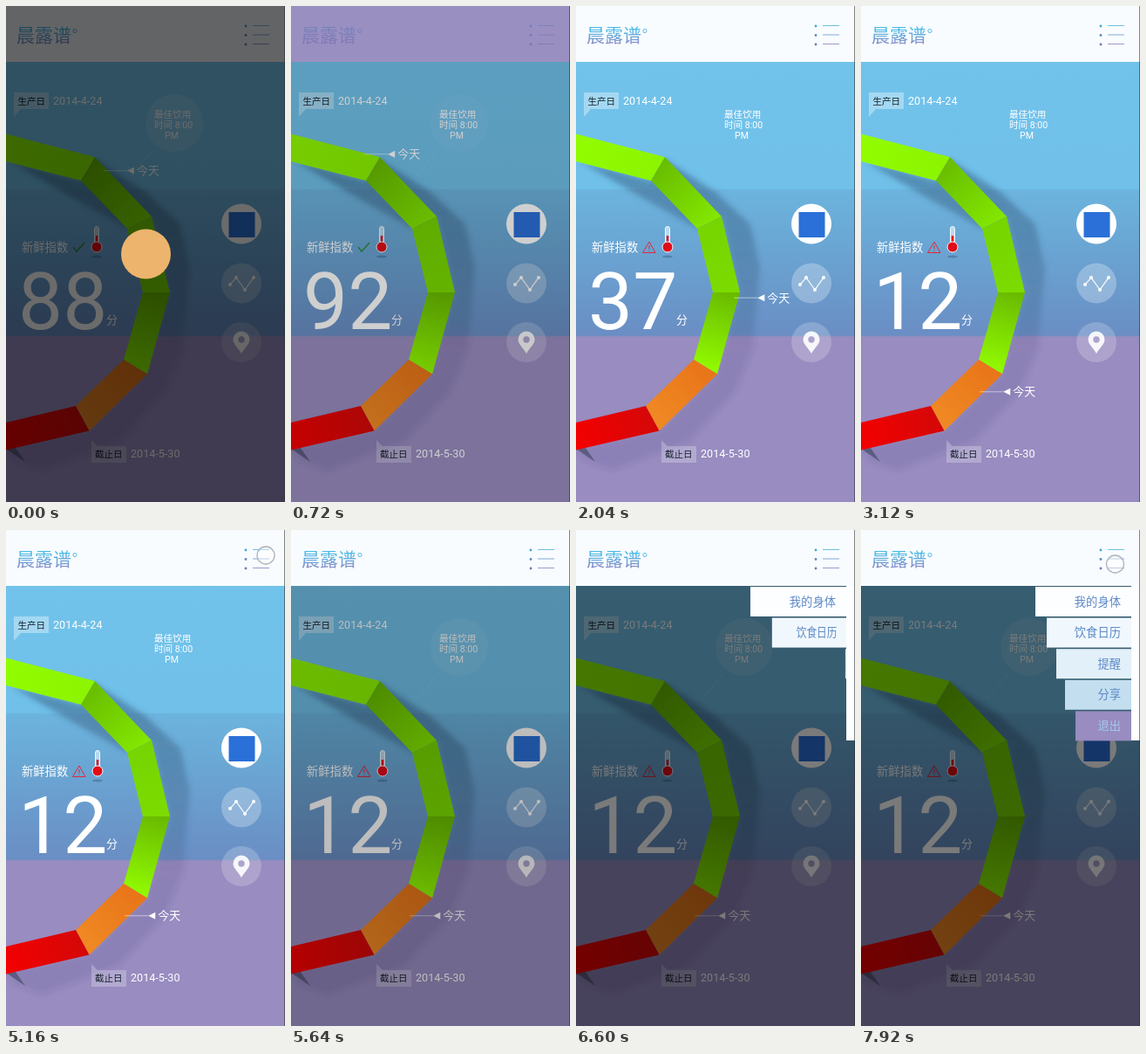
These frames come from a looping animation (320x568 px, 8000 ms). An HTML page:

```html
<!DOCTYPE html>
<html lang="zh">
<head>
<meta charset="utf-8">
<style>
  html, body { margin: 0; width: 100%; height: 100%; overflow: hidden; background: #988cc0; }
  svg { display: block; width: 100vw; height: 100vh; font-family: Roboto, "Noto Sans CJK SC", sans-serif; }
  .w { fill: #fff; }
  .line { fill: none; stroke: #fff; }
</style>
</head>
<body>
<svg viewBox="0 0 320 568">
  <defs>
    <linearGradient id="scene" gradientUnits="userSpaceOnUse" x1="0" y1="0" x2="0" y2="568">
      <stop offset="0" stop-color="#72c4ec"/>
      <stop offset=".368" stop-color="#70c0e9"/>
      <stop offset=".371" stop-color="#6cb4de"/>
      <stop offset=".45" stop-color="#6aaad6"/>
      <stop offset=".664" stop-color="#6a8ec4"/>
      <stop offset=".667" stop-color="#988cc0"/>
      <stop offset="1" stop-color="#988cc0"/>
    </linearGradient>
    <linearGradient id="ink" x1="0" y1="0" x2="0" y2="1">
      <stop offset=".2" stop-color="#4cbbe6"/>
      <stop offset=".9" stop-color="#8a8cc8"/>
    </linearGradient>
    <linearGradient id="shade" gradientUnits="userSpaceOnUse" x1="0" y1="180" x2="0" y2="530">
      <stop offset="0" stop-color="#34587c" stop-opacity=".5"/>
      <stop offset=".5" stop-color="#34587c" stop-opacity=".24"/>
      <stop offset=".6" stop-color="#40386c" stop-opacity=".12"/>
      <stop offset="1" stop-color="#40386c" stop-opacity=".12"/>
    </linearGradient>
    <filter id="soft"><feGaussianBlur stdDeviation="3"/></filter>
  </defs>

  <rect width="320" height="568" fill="url(#scene)"/>
  <path fill="url(#shade)" filter="url(#soft)" d="M5 178L86 200 101 175 160 213 200 250 211 300 203 392 182 442 130 498 42 532 8 520 0 506 95 486 161 421 187 328 166 241 139 255 80 222Z"/>
  <path fill="#5c5c80" d="M0 507L11 506 22 522Z"/>
  <g id="ring"></g>

  <g id="bubble">
    <circle class="w" cx="193" cy="134" r="33" opacity=".3"/>
    <path class="line" d="M170 164L143 195" opacity=".5"/>
  </g>
  <g class="w" font-size="10.6">
    <text x="170" y="128">最佳饮用</text>
    <text x="170" y="140">时间 8:00</text>
    <text x="182" y="152">PM</text>
  </g>

  <path class="w" opacity=".36" d="M9 99H49V118H17L9 127Z"/>
  <path class="w" opacity=".25" d="M98 497L105 504H138V523H98Z"/>
  <g font-size="10.5" font-weight="500" fill="#16202c">
    <text x="13.5" y="113">生产日</text>
    <text x="102" y="517">截止日</text>
  </g>
  <g class="w" font-size="12.6">
    <text x="54" y="113">2014-4-24</text>
    <text x="143" y="517">2014-5-30</text>
  </g>

  <text class="w" x="18" y="281" font-size="13.3">新鲜指数</text>
  <path id="tick" fill="none" stroke="#2f8a45" stroke-width="1.5" d="M77 276L81 281 90 271"/>
  <g id="warn" fill="none" stroke="#e02838">
    <path d="M84 270L91 282.5H76.5Z"/>
    <path d="M84 274V278.5M84 280V281"/>
  </g>
  <g id="thermo">
    <ellipse cx="105" cy="287" rx="6" ry="1.5" fill="#456a94" opacity=".6"/>
    <rect x="102.5" y="252.5" width="5" height="24" rx="2.5" fill="#b9d8ee" stroke="#eef8ff"/>
    <path stroke="#e00c18" stroke-width="2.5" d="M105 263V276"/>
    <circle cx="105" cy="276" r="6" fill="#e00c18" stroke="#eef8ff"/>
  </g>
  <text id="score" class="w" x="14" y="370" font-size="91"></text>
  <text class="w" x="115" y="364" font-size="13">分</text>

  <g id="today">
    <path class="line" d="M-27 0H0" opacity=".5"/>
    <path class="w" d="M0 0L8 -4V4Z"/>
    <text class="w" x="11" y="4.5" font-size="13">今天</text>
  </g>

  <g class="w">
    <circle cx="270" cy="249.5" r="23"/>
    <circle cx="270" cy="317.5" r="23" opacity=".27"/>
    <circle cx="270" cy="385" r="23" opacity=".2"/>
    <rect x="255.5" y="236" width="30" height="29" fill="#2a70d8"/>
    <path class="line" d="M257 319L264 311 274 325 284 311" stroke-width="1.3" opacity=".85"/>
    <circle cx="257" cy="319" r="2"/><circle cx="264" cy="311" r="2"/>
    <circle cx="274" cy="325" r="2"/><circle cx="284" cy="311" r="2"/>
    <path fill-rule="evenodd" opacity=".9" d="M270 398C266 391 260.5 387 260.5 382A9.5 9.5 0 0 1 279.5 382C279.5 387 274 391 270 398ZM266.3 382A3.7 3.7 0 1 0 273.7 382 3.7 3.7 0 1 0 266.3 382Z"/>
  </g>
  <rect id="dim" y="64" width="320" height="504"/>

  <g id="menu"></g>
  <rect id="bar" x="310" y="64" width="10" fill="#fdfeff"/>

  <rect width="320" height="64" fill="#f8fcff"/>
  <text x="12" y="41" font-size="21" font-weight="300" fill="url(#ink)">晨露谱°</text>
  <g id="burger"></g>
  <rect id="veil" width="320" height="64"/>
  <rect x="319" width="1" height="568" fill="#333" opacity=".6"/>
  <circle id="touch" r="10" fill="#fff" fill-opacity=".45" stroke="#aeb2ba" stroke-width="1.3"/>
  <circle id="splash" cx="160.5" cy="284" fill="#ecb46c"/>
</svg>

<script>
const $ = id => document.getElementById(id);
const LOOP = 8000;
const clamp = x => Math.max(0, Math.min(1, x));
const span = (t, a, b) => clamp((t - a) / (b - a));
const easeOut = p => 1 - (1 - p) ** 3;
const set = (id, attrs) => { for (const k in attrs) $(id).setAttribute(k, attrs[k]); };

// Piecewise linear value through [position, value] stops
function track(x, stops) {
  const i = stops.findIndex(s => s[0] >= x);
  if (i < 0) return stops[stops.length - 1][1];
  if (i === 0) return stops[0][1];
  const [a, b] = [stops[i - 1], stops[i]];
  return a[1] + (b[1] - a[1]) * (x - a[0]) / (b[0] - a[0]);
}

const outer = [[0, 146.5], [102, 173], [167, 241], [188, 328], [162, 421.5], [95.5, 486.5], [0, 508.5]];
const inner = [[0, 178], [86, 200], [139, 255], [157, 328], [135, 405], [80, 458], [0, 477]];
const shades = [['#92fc00', '#8cf400'], ['#68bc00', '#84e800'], ['#76d400', '#7cdc00'],
  ['#68b800', '#92fc00'], ['#e87418', '#f08a24'], ['#d40808', '#f40000']];

$('ring').innerHTML = shades.map(([from, to], i) => {
  const [a, b, c, d] = [outer[i], outer[i + 1], inner[i + 1], inner[i]];
  return `<linearGradient id="s${i}" gradientUnits="userSpaceOnUse" x1="${a[0]}" y1="${a[1]}" x2="${b[0]}" y2="${b[1]}">
    <stop stop-color="${from}"/><stop offset="1" stop-color="${to}"/></linearGradient>
    <path fill="url(#s${i})" d="M${a}L${b} ${c} ${d}Z"/>`;
}).join('');

$('burger').innerHTML = ['#6cbfe2', '#84a8d6', '#a096cc'].map((color, i) => {
  const y = 22.5 + i * 10.5;
  return `<circle cx="275" cy="${y + .5}" r="1.4" fill="${['#3fa9d8', '#5c8ac4', '#6f78b8'][i]}"/>
    <path stroke="${color}" d="M283 ${y}H302"/>`;
}).join('');

const items = [['我的身体', 200, '#fdfeff'], ['饮食日历', 213, '#f1f8fd'], ['提醒', 224, '#e2f0f9'],
  ['分享', 234, '#c3deef'], ['退出', 246, '#988cc0']];
$('menu').innerHTML = items.map(([label, x, color], i) => {
  const y = 65 + i * 35.6;
  return `<g><rect x="${x}" y="${y}" width="${310 - x}" height="34" fill="${color}"/>
    <text x="298" y="${y + 21.5}" font-size="13.3" text-anchor="end" fill="${i < 4 ? '#5b88c6' : '#a4c8ee'}">${label}</text></g>`;
}).join('');

// Point at a given length along the outer edge of the ring
function along(s) {
  for (let i = 1; i < outer.length; i++) {
    const [ax, ay] = outer[i - 1], [bx, by] = outer[i];
    const len = Math.hypot(bx - ax, by - ay);
    if (s <= len) return [ax + (bx - ax) * s / len, ay + (by - ay) * s / len];
    s -= len;
  }
  return outer[outer.length - 1];
}

function draw(t) {
  const rise = span(t, 0, 720), fall = span(t, 720, 3120);
  const s = 127 - 35 * rise + 323 * (fall + .32 * fall * (1 - fall));
  const [x, y] = along(s);
  const score = Math.round(track(s, [[92, 92], [127, 88], [297, 36], [415, 12]]));
  set('today', { transform: `translate(${x + 22} ${y})` });
  $('score').textContent = score;
  const good = score >= 50;
  set('tick', { opacity: +good });
  set('warn', { opacity: +!good });
  set('thermo', { transform: `translate(${good ? -1 : 0} 0)` });

  const dim = track(t, [[0, .58], [1070, 0], [5220, 0], [6060, .52]]);
  set('dim', { opacity: dim });
  set('bubble', { opacity: dim * .8 });
  const tint = [131, 116, 177].map(c => Math.round(c * rise));
  set('veil', { fill: `rgb(${tint})`, opacity: track(t, [[0, .6], [720, .8], [840, 0]]) });
  set('splash', { r: 28.5 * (1 - span(t, 0, 480) ** 2) });

  set('bar', { height: 177 * easeOut(span(t, 6120, 6480)) });
  [...$('menu').children].forEach((item, i) => {
    const p = easeOut(span(t, 6360 + i * 120, 6600 + i * 120));
    item.setAttribute('transform', `translate(${310 * (1 - p)} 0) scale(${p} 1)`);
  });

  const late = t >= 7920;
  set('touch', {
    cx: late ? 291.5 : 298, cy: late ? 39 : 29,
    opacity: late || (t >= 5160 && t < 5400) ? 1 : 0
  });
}

function tick(now) {
  draw(now % LOOP);
  requestAnimationFrame(tick);
}
draw(0);
requestAnimationFrame(tick);
</script>
</body>
</html>
```
